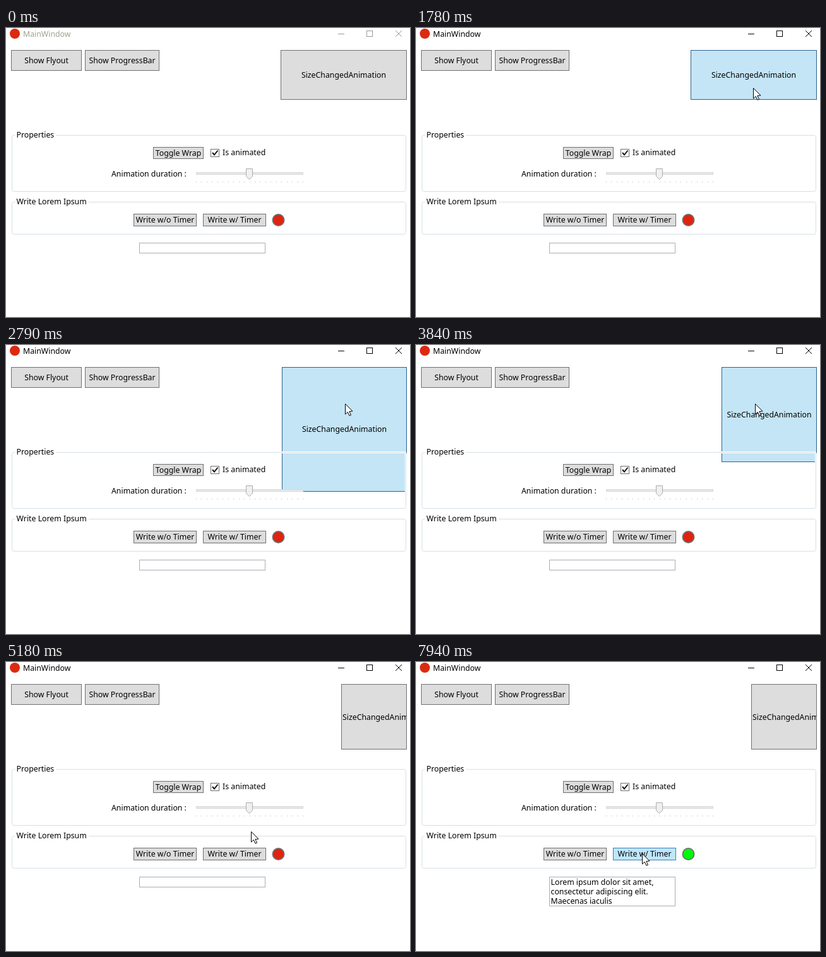
These frames come from a looping animation (640 px wide and 459 px high, 8 s). An HTML page with a canvas:

```html
<!DOCTYPE html>
<html lang="en">
<head>
<meta charset="utf-8">
<title>MainWindow</title>
<style>
  html, body { margin: 0; width: 100%; height: 100%; overflow: hidden; background: #fff; }
  canvas { display: block; }
</style>
</head>
<body>
<canvas id="stage" width="640" height="459"></canvas>
<script>
const ctx = document.getElementById('stage').getContext('2d');
const LOOP = 8000;
const LOREM = 'Lorem ipsum dolor sit amet, consectetur adipiscing elit. Maecenas iaculis';
const RIGHT = 635, TOP = 35;

// pointer strokes: each starts where the previous one ended, optionally bent towards via
const ENTRY = { x: 325, y: 394 };
const STROKES = [
  { from: 300, to: 650, end: { x: 70, y: 50 } },
  { from: 1070, to: 1710, end: { x: 534, y: 95 }, via: { x: 200, y: 340 } },
  { from: 1900, to: 1940, end: { x: 537, y: 93 } },
  { from: 4500, to: 5420, end: { x: 358, y: 304 } }
];
// every click on the big button picks a new square size
const CLICKS = [
  { down: 1780, up: 1860, size: 101 },
  { down: 2280, up: 2420, size: 198 },
  { down: 2790, up: 2920, size: 174 },
  { down: 3340, up: 3410, size: 151 },
  { down: 3760, up: 3850, size: 108 },
  { down: 4260, up: 4410, size: 104.4 }
];
const TIMER = { down: 5760, up: 5840 };
const TYPED = 7930;
const WRAPS = [6630, 7440];

const clamp = v => Math.max(0, Math.min(1, v));
const mix = (a, b, k) => a + (b - a) * k;
const easeOut = v => 1 - (1 - clamp(v)) ** 3;
const smooth = v => clamp(v) ** 2 * (3 - 2 * clamp(v));
const held = (click, t) => t >= click.down && t < click.up;

function pointer(t) {
  if (t < STROKES[0].from) return null;
  let p = ENTRY;
  for (const { from, to, end, via } of STROKES) {
    const k = smooth((t - from) / (to - from));
    const bend = axis => {
      const mid = via ? via[axis] : (p[axis] + end[axis]) / 2;
      return mix(mix(p[axis], mid, k), mix(mid, end[axis], k), k);
    };
    if (t >= from) p = { x: bend('x'), y: bend('y') };
  }
  return { x: Math.round(p.x), y: Math.round(p.y) };
}

function text(str, x, y, color = '#000') {
  ctx.fillStyle = color;
  ctx.fillText(str, x, y);
}

function box(x, y, w, h, fill, stroke) {
  ctx.fillStyle = stroke;
  ctx.fillRect(x, y, w, h);
  ctx.fillStyle = fill;
  ctx.fillRect(x + 1, y + 1, w - 2, h - 2);
}

function path(points) {
  ctx.beginPath();
  points.forEach(([x, y]) => ctx.lineTo(x, y));
}

function line(points, color, width = 1) {
  path(points);
  ctx.strokeStyle = color;
  ctx.lineWidth = width;
  ctx.stroke();
}

function polygon(points, fill, stroke) {
  path(points);
  ctx.closePath();
  ctx.fillStyle = fill;
  ctx.fill();
  ctx.strokeStyle = stroke;
  ctx.lineWidth = 1;
  ctx.stroke();
}

function disc(x, y, r, fill) {
  ctx.beginPath();
  ctx.arc(x, y, r, 0, Math.PI * 2);
  ctx.fillStyle = fill;
  ctx.fill();
}

function clipped(x, y, w, h, draw) {
  ctx.save();
  ctx.beginPath();
  ctx.rect(x, y, w, h);
  ctx.clip();
  draw();
  ctx.restore();
}

function button(label, x, y, w, h, mouse, pressed) {
  const over = mouse && mouse.x >= x && mouse.x < x + w && mouse.y >= y && mouse.y < y + h;
  const [fill, stroke] = pressed ? ['#c4e5f6', '#2c628b']
    : over ? ['#bee6fd', '#3c7fb1'] : ['#dddddd', '#707070'];
  const left = Math.round(x), wide = Math.round(w), high = Math.round(h);
  const textX = Math.max(left + 2, x + (w - ctx.measureText(label).width) / 2);
  box(left, y, wide, high, fill, stroke);
  clipped(left + 1, y + 1, wide - 2, high - 2,
    () => text(label, textX, Math.round(y + h / 2 + 4.4)));
}

function group(label, y, h, gapEnd) {
  ctx.save();
  ctx.beginPath();
  ctx.rect(0, y + 3, 640, h);
  ctx.rect(0, y - 3, 14, 6);
  ctx.rect(gapEnd, y - 3, 640 - gapEnd, 6);
  ctx.clip();
  for (const [color, width] of [['#ffffff', 3], ['#d5dfe5', 1]]) {
    ctx.beginPath();
    ctx.roundRect(9.5, y + 0.5, 624, h, 3);
    ctx.strokeStyle = color;
    ctx.lineWidth = width;
    ctx.stroke();
  }
  ctx.restore();
  text(label, 16.5, y + 4);
}

function titleBar(active) {
  disc(14, 9, 8, '#dc2a10');
  text('MainWindow', 27, 14, active ? '#000' : '#a0a08f');
  const ink = active ? '#000' : '#999';
  line([[526, 9.5], [536, 9.5]], ink);
  ctx.strokeRect(571.5, 4.5, 9, 9);
  line([[617, 4], [627, 14]], ink);
  line([[627, 4], [617, 14]], ink);
}

function slider() {
  box(301, 229, 170, 4, '#e7eaea', '#d6d6d6');
  ctx.fillStyle = '#e0e0e0';
  for (let i = 0; i <= 20; i++) ctx.fillRect(Math.round(301 + i * 8.45), 243, 1, 3);
  polygon([[380.5, 223.5], [390.5, 223.5], [390.5, 235.5], [385.5, 240.5], [380.5, 235.5]],
    '#f0f0f0', '#acacac');
}

function wrap(str, width) {
  const lines = [''];
  for (const word of str.match(/\S+\s*/g) || []) {
    const last = lines.length - 1;
    if (lines[last] && ctx.measureText(lines[last] + word.trim()).width > width) lines.push(word);
    else lines[last] += word;
  }
  return lines;
}

function textBox(t) {
  const grown = WRAPS.reduce((sum, at) => sum + easeOut((t - at) / 200), 0);
  const h = 17 + Math.round(15 * grown);
  box(211, 341, 200, h, '#fff', '#abadb3');
  // typing slows a little as the text gets longer
  const done = 1 - (1 - clamp((t - TIMER.up) / (TYPED - TIMER.up))) ** 1.22;
  const lines = wrap(LOREM.slice(0, Math.floor(LOREM.length * done)), 192);
  clipped(212, 342, 198, h - 2, () => lines.forEach((s, i) => text(s, 213.5, 354 + 15 * i)));
}

function sizeButton(t, mouse) {
  let w = 200, h = 79;
  for (const { up, size } of CLICKS) {
    const k = easeOut((t - up) / 215);
    w = mix(w, size, k);
    h = mix(h, size, k);
  }
  button('SizeChangedAnimation', RIGHT - w, TOP, w, h, mouse, CLICKS.some(c => held(c, t)));
}

function arrow({ x, y }) {
  const shape = [[0, 0], [0, 16.5], [3.8, 13], [6.5, 18.8], [9, 17.7], [6.4, 12], [11.5, 11.6]];
  polygon(shape.map(([dx, dy]) => [x + dx + 0.5, y + dy + 0.5]), '#fff', '#000');
}

function render(t) {
  const mouse = pointer(t);
  ctx.font = '12.3px "Noto Sans", "Open Sans", sans-serif';
  ctx.fillStyle = '#fff';
  ctx.fillRect(0, 0, 640, 459);

  titleBar(t >= CLICKS[0].down);
  button('Show Flyout', 8, 35, 112, 33, mouse);
  button('Show ProgressBar', 125, 35, 118, 33, mouse);
  sizeButton(t, mouse);

  group('Properties', 170, 89, 79);
  button('Toggle Wrap', 233, 189, 80, 19, mouse);
  box(324, 192, 14, 13, '#fff', '#707070');
  line([[327, 198], [330, 201.5], [335.5, 194.5]], '#111', 2);
  text('Is animated', 343, 202);
  text('Animation duration :', 167, 236);
  slider();

  group('Write Lorem Ipsum', 276, 51, 131);
  button('Write w/o Timer', 202, 295, 100, 20, mouse);
  button('Write w/ Timer', 312, 295, 100, 20, mouse, held(TIMER, t));
  disc(431.5, 305, 10, '#707070');
  disc(431.5, 305, 8.2, t >= TIMER.up ? '#00f90a' : '#dd2410');

  textBox(t);
  if (mouse) arrow(mouse);
}

const start = performance.now();
function tick() {
  render((performance.now() - start) % LOOP);
  requestAnimationFrame(tick);
}
tick();
</script>
</body>
</html>
```
